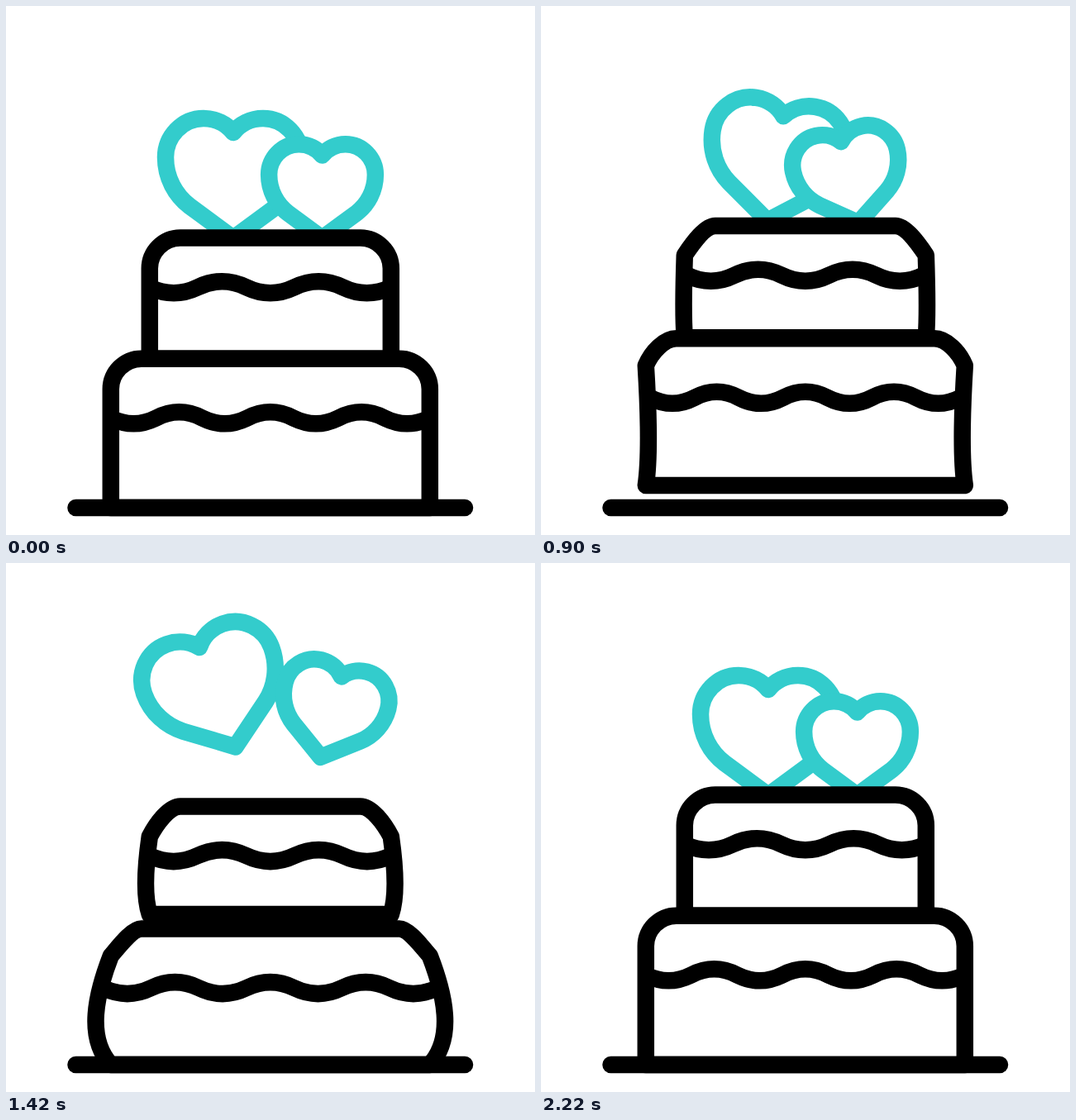
Animation of 640 by 640 pixels, one loop 2.4 s. Source, as an HTML page:

```html
<!DOCTYPE html>
<html lang="en">
<head>
<meta charset="utf-8">
<title>Wedding cake</title>
<style>
  html, body { margin: 0; width: 100%; height: 100%; overflow: hidden; background: #fff; }
  svg { display: block; width: 100vw; height: 100vh; }
  path { fill: #fff; stroke: #000; stroke-width: 20.5; stroke-linejoin: round; }
  .wave { fill: none; }
  #base { stroke-linecap: round; }
  #heart { stroke: #3cc; stroke-width: inherit; }
  #left { stroke-width: 20.5; }
  #right { stroke-width: 26.1; }
</style>
</head>
<body>
<svg viewBox="0 0 640 640">
  <defs>
    <path id="heart" d="M0 0L53 -39C70 -52 82 -73 82 -98S62 -145 36 -145C21 -145 8 -138 0 -128
      C-8 -138 -21 -145 -36 -145C-62 -145 -82 -123 -82 -98S-70 -52 -53 -39Z"/>
  </defs>
  <use id="left" href="#heart"/>
  <use id="right" href="#heart"/>
  <path id="upper"/>
  <path id="upperWave" class="wave"/>
  <path id="lower"/>
  <path id="lowerWave" class="wave"/>
  <path id="base" d="M84.5 607H555"/>
</svg>
<script>
const LOOP = 2400, STEP = 20, MID = 319.8;
const TAKEOFF = 680, TOUCHDOWN = 1520;

const ease = p => p * p * (3 - 2 * p);

// A hop runs rest, crouch, apex, landing, rest at the given times.
// The result blends a crouch value and an apex value at time t.
function hop(times, landing = 1) {
  const crouch = [0, 1, 0, landing, 0], apex = [0, 0, 1, 0, 0];
  return t => {
    const next = times.findIndex(time => t < time);
    if (next < 1) return () => 0;
    const from = next - 1;
    const p = ease((t - times[from]) / (times[next] - times[from]));
    const at = w => w[from] + (w[next] - w[from]) * p;
    return (c, a) => c * at(crouch) + a * at(apex);
  };
}

const lowerHop = hop([200, 600, 1000, 1400, 1700]);
const upperHop = hop([280, TAKEOFF, 1100, TOUCHDOWN, 1920], .69);
const turnHop = hop([200, 840, 1300, 1800, 2220], .1);
const heartHop = land => hop([200, TAKEOFF, 1220, land, 1920], .47);

const hearts = [
  { id: "left", x: 275, scale: 1, hop: heartHop(1680), dip: 27.5, rise: -107, lean: 10.3, swing: -23.5 },
  { id: "right", x: 382.5, scale: .785, hop: heartHop(1640), dip: 26, rise: -97, lean: -13.5, swing: 17.3 }
];

const set = (id, name, value) => document.getElementById(id).setAttribute(name, value);

// Rounded tier with bulging sides; flat turns the round corners into slopes
function tier({ half, top, shoulder, foot, bulge, flat }) {
  const len = foot - shoulder;
  const [l, r] = [-1, 1].map(sign => {
    const p = (inset, y) => [MID + sign * (half - inset), y];
    return {
      top: p(37, top), c2: p(16.6 + 10 * flat, top),
      c1: p(12 * flat, shoulder - 20 + 6 * flat), shoulder: p(0, shoulder),
      s1: p(-bulge, shoulder + len * .35), s2: p(-1.7 * bulge, shoulder + len * .75),
      foot: p(0, foot)
    };
  });
  return `M${l.top}L${r.top}C${[r.c2, r.c1, r.shoulder, r.s1, r.s2, r.foot]}` +
    `L${l.foot}C${[l.s2, l.s1, l.shoulder, l.c1, l.c2, l.top]}Z`;
}

function wave(half, y, arcs) {
  const w = 2 * half / arcs;
  return `M${MID - half} ${y}q${w / 2} 14 ${w} 0` + `t${w} 0`.repeat(arcs - 1);
}

function render(t) {
  const low = lowerHop(t), up = upperHop(t), turn = turnHop(t);

  const lift = low(0, -32), lowTop = lift + low(16, 0);
  set("lower", "d", tier({
    half: 193, top: 426.7 + lowTop, shoulder: 463.5 + lift + low(12, -4),
    foot: 607 + lift, bulge: low(18, -7), flat: low(1, .5)
  }));
  set("lowerWave", "d", wave(193 + low(9, -8), 498.3 + lowTop, 7));

  // The upper tier rides on the lower one except while it flies
  const flying = t > TAKEOFF && t < TOUCHDOWN;
  const foot = flying ? Math.min(up(11, -57), lowTop) : lowTop;
  const top = foot + up(27, -3);
  set("upper", "d", tier({
    half: 146, top: 280.5 + top, shoulder: 317.5 + top + up(0, -3),
    foot: 426.7 + foot, bulge: up(9.5, -6), flat: up(1, .7)
  }));
  set("upperWave", "d", wave(146 + up(2.5, -8), 340.2 + top, 5));

  for (const h of hearts) {
    const angle = turn(h.lean, h.swing);
    const y = 281 + h.hop(t)(h.dip, h.rise);
    set(h.id, "transform",
      `translate(${h.x - .13 * angle} ${y}) rotate(${angle}) scale(${h.scale})`);
  }
}

const start = performance.now();
function tick() {
  const t = (performance.now() - start) % LOOP;
  render(Math.floor(t / STEP) * STEP);
  requestAnimationFrame(tick);
}
tick();
</script>
</body>
</html>
```
